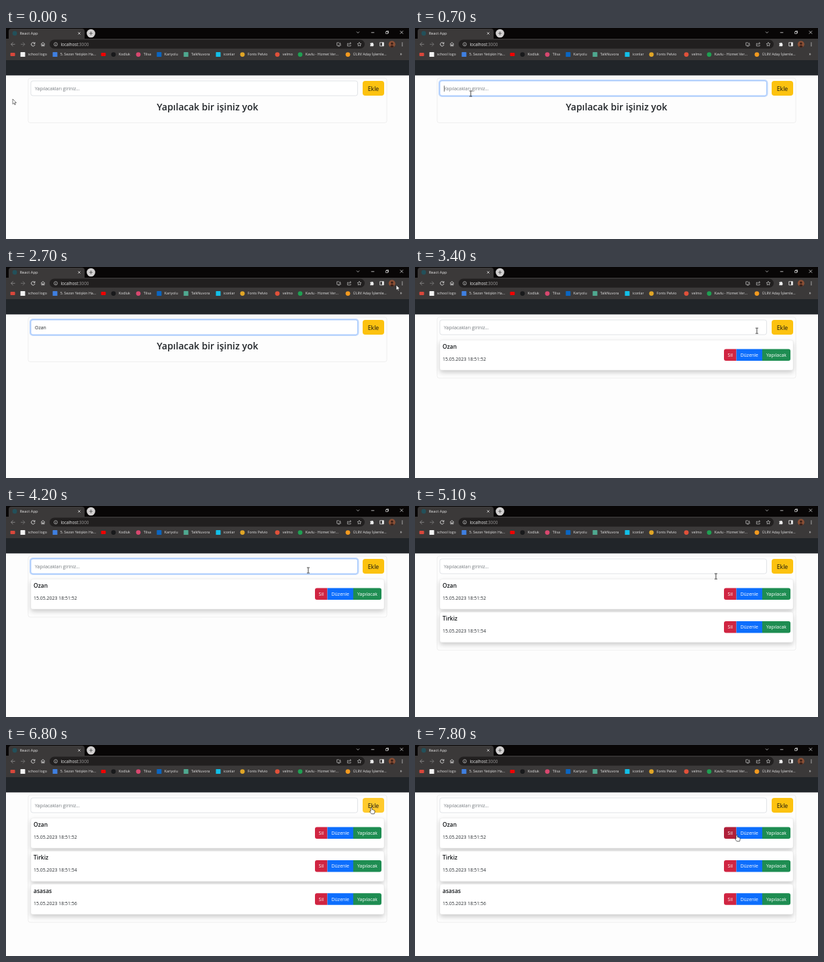
Animation of 600x315 px, one loop 8000 ms. Source, as an HTML page with a canvas:

```html
<!DOCTYPE html>
<html lang="tr">
<head>
<meta charset="utf-8">
<title>React App</title>
<style>
html, body { margin: 0; width: 100%; height: 100%; overflow: hidden; background: #fff; }
canvas { display: block; width: 600px; height: 315px; }
</style>
</head>
<body>
<canvas id="stage"></canvas>
<script>
const W = 600, H = 315, LOOP = 8000, STEP = 100;
const FONT = '"Open Sans", "Noto Sans", sans-serif';
const canvas = document.getElementById('stage');
const dpr = window.devicePixelRatio || 1;
canvas.width = W * dpr;
canvas.height = H * dpr;
const c = canvas.getContext('2d');

// Entries: key times while typing, then the moment the entry is added
const todos = [
  { text: 'Ozan', focus: 700, keys: [900, 1100, 1300, 1500], caretEnd: 1900, added: 3100, date: '15.05.2023 18:51:52' },
  { text: 'Tirkiz', focus: 4000, keys: [4400, 4400, 4500, 4600, 4600, 4700], caretEnd: 4800, added: 4900, date: '15.05.2023 18:51:54' },
  { text: 'asasas', focus: 5300, keys: [5600, 5700, 5900, 6000, 6100, 6200], caretEnd: 6300, added: 6700, date: '15.05.2023 18:51:56' }
];

// Pointer path: time, x, y
const path = [
  [0, 10, 106], [400, 10, 106], [500, 26, 112], [600, 58, 106], [700, 83, 98],
  [2300, 83, 98], [2400, 160, 90], [2700, 581, 27], [2800, 591, 21], [2900, 572, 62],
  [3000, 549, 92], [3200, 547, 94], [3700, 452, 97], [4100, 452, 97], [4200, 450, 96],
  [4700, 450, 96], [4800, 540, 93], [4900, 540, 93], [5000, 500, 98], [5100, 448, 105],
  [5200, 446, 94], [6300, 446, 94], [6400, 480, 93], [6600, 541, 92], [6800, 543, 93],
  [7200, 520, 112], [7800, 478, 134], [LOOP, 478, 134]
];
const hidden = [[900, 2400], [4400, 4800], [5600, 6400]];

const bookmarks = [
  [10, '', '#d9473b'], [25, 'school logo', '#f2f2f2'], [73, '5. Sezon Yetişkin Ha...', '#3f7fe0'],
  [145, '', '#f00000'], [160, 'Kodluk', '#18191b', 1], [197, 'Tilsa', '#d8476f', 1],
  [228, 'Kariyolu', '#0a66c2'], [268, 'TalkNuvora', '#4fa88f'], [316, 'iconlar', '#12bfe8'],
  [352, 'Fonts Pelvio', '#e0a526', 1], [404, 'velmo', '#e0513a', 1],
  [438, 'Kavlu - Hizmet Ver...', '#1fa052', 1], [509, 'ÜLRV Aday İşlemle...', '#f29a1f', 1]
];

const itemButtons = [
  { label: 'Sil', x: 460, w: 18.5, color: '#d02542', hover: '#b0203a', radii: [3, 0, 0, 3] },
  { label: 'Düzenle', x: 478.5, w: 38.5, color: '#0d6efd', hover: '#0b5ed7', radii: 0 },
  { label: 'Yapılacak', x: 517, w: 42, color: '#1e8d52', hover: '#157347', radii: [0, 3, 3, 0] }
];
const addBtn = { x: 531, y: 79, w: 32, h: 22 };

function text(str, x, mid, size, color, weight = 400, align = 'left') {
  c.font = `${weight} ${size}px ${FONT}`;
  c.textAlign = align;
  c.fillStyle = color;
  c.fillText(str, x, mid + size * 0.357);
  return c.measureText(str).width;
}

function box(x, y, w, h, r, fill, stroke, lineWidth = 0.6) {
  c.beginPath();
  c.roundRect(x, y, w, h, r);
  paint(fill, stroke, lineWidth);
}

function dot(x, y, r, fill, stroke, lineWidth) {
  c.beginPath();
  c.arc(x, y, r, 0, Math.PI * 2);
  paint(fill, stroke, lineWidth);
}

function paint(fill, stroke, lineWidth = 0.8) {
  if (fill) { c.fillStyle = fill; c.fill(); }
  if (stroke) { c.strokeStyle = stroke; c.lineWidth = lineWidth; c.stroke(); }
}

function shape(d, x, y, fill, stroke, lineWidth = 0.8) {
  const p = new Path2D(d);
  c.save();
  c.translate(x, y);
  if (fill) { c.fillStyle = fill; c.fill(p); }
  if (stroke) { c.strokeStyle = stroke; c.lineWidth = lineWidth; c.stroke(p); }
  c.restore();
}

const inside = (p, r) => p.x >= r.x && p.x < r.x + r.w && p.y >= r.y && p.y < r.y + r.h;
const within = (t, [a, b]) => t >= a && t < b;

function pointerAt(t) {
  const i = path.findIndex((k, n) => n > 0 && t <= k[0]);
  const [t0, x0, y0] = path[i - 1], [t1, x1, y1] = path[i];
  const f = (t - t0) / (t1 - t0);
  return { x: x0 + (x1 - x0) * f, y: y0 + (y1 - y0) * f };
}

function drawTabs() {
  box(0, 0, W, 17, 0, '#080606');
  box(4, 1, 113, 20, 4, '#3b3939');
  dot(13, 8, 3.4, '#23505a');
  text('React App', 20.5, 8, 5.8, '#e6e6e6');
  shape('M-1.7-1.7L1.7 1.7M1.7-1.7L-1.7 1.7', 109, 8, null, '#e0e0e0');
  dot(126.5, 8, 6.3, '#d2d0d0');
  shape('M-2.6 0H2.6M0-2.6V2.6', 126.5, 8, null, '#444');
  shape('M-2-1L0 1L2-1', 524, 6.5, null, '#c8c8c8');
  shape('M-2.3 0H2.3', 546, 6.8, null, '#e0e0e0');
  shape('M-2-1H1V2H-2ZM-1-1V-2H2V1H1', 567.5, 6.5, null, '#e0e0e0', 0.7);
  shape('M-2.2-2.2L2.2 2.2M2.2-2.2L-2.2 2.2', 589, 6.5, null, '#e0e0e0');
}

function drawToolbar() {
  const y = 24.3, ink = '#dedede';
  box(0, 16, W, 32, 0, '#3b3939');
  shape('M3 0H-3M0-3L-3 0L0 3', 10.5, y, null, '#8d8b8b', 0.9);
  shape('M-3 0H3M0-3L3 0L0 3', 25, y, null, '#777575', 0.9);
  shape('M2.2-1.6A2.7 2.7 0 1 0 2.7.6M2.7-3V-1H.6', 40.3, y, null, ink, 0.95);
  shape('M-3 0L0-2.8L3 0M-2-.6V2.6H-.6V.6H.6V2.6H2V-.6', 55, y, null, ink);
  box(65, 17.6, 469, 13.2, 6.6, '#211f1f');
  dot(74, y, 2.6, null, '#c4c4c4', 0.7);
  shape('M0-.3V1.5M0-1.5V-.9', 74, y, null, '#c4c4c4');
  const w = text('localhost', 81.5, y, 6.2, '#ececec');
  text(':3000', 81.5 + w, y, 6.2, '#9c9a9a');
  shape('M.5-2.4H-2.8V1.8H2.8V.4M-1.5 2.8H1.5M1.8-2.6V0M.6-1L1.8.2L3-1', 495.5, y, null, '#c8c8c8', 0.7);
  shape('M-.8-1.2H-2.6V2.6H2.2V1M-1 .8Q-.6-1.5 2.4-1.5M1-3L2.7-1.5L1 0', 511, y, null, '#c8c8c8', 0.7);
  shape('M0-3L.9-1L3-.8L1.4.6L1.9 2.7L0 1.6L-1.9 2.7L-1.4.6L-3-.8L-.9-1Z', 526, y, null, '#c8c8c8', 0.7);
  shape('M-2.8-1.8H-1A1.1 1.1 0 0 1 1-1.8H2V0A1.1 1.1 0 0 1 2 2V3H-2.8V1.5A1 1 0 0 0-2.8-.4Z', 545, y, '#ececec');
  shape('M-2.8-2.6H2.8V2.6H-2.8Z', 559.5, y, null, '#ececec');
  box(560, y - 2.6, 2.3, 5.2, 0, '#ececec');
  dot(574.7, y, 5, '#8a4f35');
  dot(574.7, y - 1, 1.7, '#3a2119');
  shape('M-3 3.8Q0-.8 3 3.8Q0 6 -3 3.8Z', 574.7, y, '#3a2119');
  for (const d of [-2.2, 0, 2.2]) dot(590, y + d, 0.7, ink);
}

function drawBookmarks() {
  const y = 39.6;
  for (const [x, label, color, round] of bookmarks) {
    if (round) dot(x, y, 3.4, color);
    else if (label) box(x - 3.5, y - 3.5, 7, 7, 0.6, color);
    else box(x - 3.5, y - 2.5, 7, 5, 1, color);
    text(label, x + 7.8, y, 5.3, '#e4e4e4');
  }
  text('»', 588, y - 0.4, 6.4, '#e4e4e4', 400, 'center');
}

function drawForm(t, mouse) {
  const active = todos.find(d => within(t, [d.focus, d.added]));
  if (active) box(36, 78, 488.5, 24, 4, null, '#c2d9fc', 2);
  box(37, 79, 486.5, 22, 3, '#fff', active ? '#86b7fe' : '#d5d9dd', 0.7);

  const typed = active ? active.text.slice(0, active.keys.filter(k => k <= t).length) : '';
  let width = 0;
  if (typed) width = text(typed, 43, 90.5, 6.95, '#212529');
  else text('Yapılacakları giriniz...', 43, 90.5, 6.95, '#73787d');
  const caretStart = active && (active === todos[0] ? active.focus : active.keys[0]);
  if (active && within(t, [caretStart, active.caretEnd])) box(43 + width, 86, 0.6, 9, 0, '#222');

  const over = mouse && inside(mouse, addBtn);
  box(addBtn.x, addBtn.y, addBtn.w, addBtn.h, 4, over ? '#ffca2c' : '#fcc20f');
  text('Ekle', 547, 90.5, 8.7, '#111', 400, 'center');
}

const itemTop = i => 109 + i * 49.4;
const buttonRect = (b, i) => ({ x: b.x, y: itemTop(i) + 13.5, w: b.w, h: 17.5 });

function drawItem(item, i, mouse) {
  const y = itemTop(i);
  c.save();
  c.shadowColor = 'rgba(0,0,0,.2)';
  c.shadowBlur = 7.2 * dpr;
  c.shadowOffsetY = 3.6 * dpr;
  box(37, y, 526, 45, 3, '#fff');
  c.restore();
  box(37, y, 526, 45, 3, '#fff', '#e3e3e3', 0.5);
  text(item.text, 41, y + 9.7, 8.5, '#111417', 600);
  text(item.date, 41, y + 28.5, 6.95, '#2b2f33');
  for (const b of itemButtons) {
    const r = buttonRect(b, i);
    box(r.x, r.y, r.w, r.h, b.radii, mouse && inside(mouse, r) ? b.hover : b.color);
    text(b.label, r.x + r.w / 2, r.y + 9, 7, '#fff', 400, 'center');
  }
}

function drawPointer(p, count) {
  const overItem = todos.slice(0, count).some((_, i) => itemButtons.some(b => inside(p, buttonRect(b, i))));
  if (overItem || inside(p, addBtn)) {
    shape('M0 .8Q1-.5 2 .8V3.6Q3 3 3.4 4Q4.4 3.5 4.8 4.6Q6 4.2 6 5.4V7.4L5.2 9.8H1.2L-1.4 6.6Q-1.6 5.2 0 6Z',
      p.x, p.y, '#fff', '#222', 0.7);
  } else if (inside(p, { x: 37, y: 79, w: 487, h: 29 })) {
    shape('M-2-4H-.5L0-3.6L.5-4H2M0-3.6V3.6M-2 4H-.5L0 3.6L.5 4H2', p.x, p.y, null, '#111', 0.8);
  } else {
    shape('M0 0V7.6L1.8 6L3 8.7L4.2 8.2L3 5.6H5.4Z', p.x, p.y, '#fff', '#222', 0.6);
  }
}

function draw(t) {
  c.setTransform(dpr, 0, 0, dpr, 0, 0);
  box(0, 0, W, H, 0, '#fdfdfd');
  drawTabs();
  drawToolbar();
  drawBookmarks();
  box(0, 48, W, 22.7, 0, '#212529');

  const items = todos.filter(d => d.added <= t);
  const mouse = hidden.some(span => within(t, span)) ? null : pointerAt(t);
  const bottom = items.length ? 116.5 + items.length * 49.4 : 141.5;
  box(33, 75, 534, bottom - 75, 3, '#fdfdfd', '#e6e6e6', 0.6);
  drawForm(t, mouse);
  if (!items.length) text('Yapılacak bir işiniz yok', 300, 118.2, 14, '#212529', 600, 'center');
  items.forEach((item, i) => drawItem(item, i, mouse));
  if (mouse) drawPointer(mouse, items.length);
}

function tick() {
  const t = performance.now() % LOOP;
  draw(Math.floor(t / STEP) * STEP);
  requestAnimationFrame(tick);
}
tick();
</script>
</body>
</html>
```
